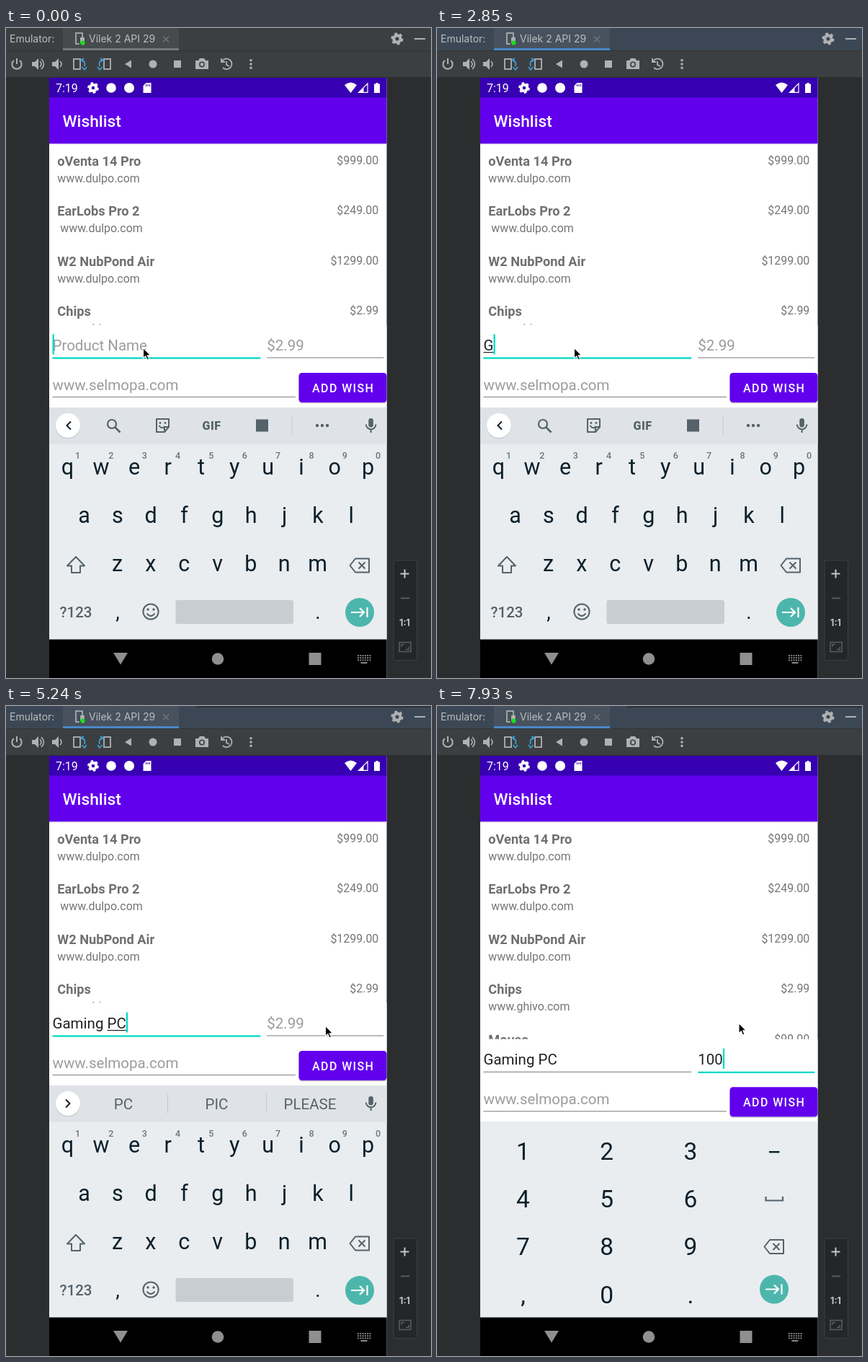
Write an HTML page that moves like this. It is 590 by 901 pixels and loops after 8000 ms.

```html
<!DOCTYPE html>
<html lang="en">
<head>
<meta charset="utf-8">
<title>Wishlist</title>
<style>
  html, body { margin: 0; width: 100%; height: 100%; overflow: hidden; background: #2b2d2f; }
  svg { display: block; width: 590px; height: 901px; }
  text { font-family: Roboto, sans-serif; white-space: pre; }
  .ui { font-family: Inter, sans-serif; }
</style>
</head>
<body>
<svg id="stage" viewBox="0 0 590 901" xmlns="http://www.w3.org/2000/svg"></svg>
<script>
const LOOP = 8000;
const TEAL = '#03dac5', PURPLE = '#6200ee', INK = '#0b1f2a', KEY = '#55626a', TOOL = '#afb1b3';
const HINT = '#9c9c9c', LINE = '#8f8f8f', BODY = '#212121', GREY = '#757575';
const PITCH = 46.35, LEFT = 64.5, PRICE = 362.3;

// Shape helpers
const text = (x, y, s, size, fill, more = '') =>
  `<text x="${x}" y="${y}" font-size="${size}" fill="${fill}" ${more}>${s}</text>`;
const mid = (x, y, s, size, fill, more = '') => text(x, y, s, size, fill, 'text-anchor="middle" ' + more);
const rect = (x, y, w, h, fill, more = '') =>
  `<rect x="${x}" y="${y}" width="${w}" height="${h}" fill="${fill}" ${more}/>`;
const disc = (x, y, r, fill, more = '') => `<circle cx="${x}" cy="${y}" r="${r}" fill="${fill}" ${more}/>`;
const fill = (d, color, more = '') => `<path d="${d}" fill="${color}" ${more}/>`;
const line = (d, color, w = 2, more = '') =>
  `<path d="${d}" fill="none" stroke="${color}" stroke-width="${w}" ${more}/>`;
const ring = (x, y, r, color, w) => disc(x, y, r, 'none', `stroke="${color}" stroke-width="${w}"`);
const at = (x, y, s) => `<g transform="translate(${x} ${y})">${s}</g>`;
const group = (id, s) => `<g id="${id}">${s}</g>`;

const gear = (x, y, r, color) => ring(x, y, r * .55, color, r * .5) +
  disc(x, y, r * .86, 'none', `stroke="${color}" stroke-width="${r * .3}" pathLength="12" stroke-dasharray="1 1"`);
const dots = (x, y, dx, dy, r, color) => [-1, 0, 1].map(i => disc(x + i * dx, y + i * dy, r, color)).join('');
const erase = (x, y) => at(x, y,
  line('M-13.5 0L-6 -9.5H13V9.5H-6Z', KEY, 2, 'stroke-linejoin="round"') + line('M-1.5 -4.5l9 9m0 -9l-9 9', KEY));
const enter = (x, y) => at(x, y, disc(0, 0, 20, '#4db6ac') + line('M-12 0H6M0 -6l6 6l-6 6M10.5 -7V7', '#fff', 2.2));
const speaker = (x, waves) => at(x, 50,
  fill('M-7 -3h4l5 -5v16l-5 -5h-4z', TOOL) + line('M4 -4q4 4 0 8' + (waves ? 'M6 -7q7 7 0 14' : ''), TOOL, 1.6));
const rotate = (x, flip) => `<g transform="translate(${x} 50) scale(${flip} 1)">` +
  rect(-8, -7, 9, 14, 'none', `stroke="${TOOL}" stroke-width="1.8"`) +
  line('M3 -6q6 2 4 9M3.5 4l3.5 4l3 -4M6 -8l-3.5 2l3 3', '#3ba0d8', 1.7) + '</g>';

function frameUi() {
  return rect(0, 0, 590, 901, '#2b2d2f') + rect(0, 0, 590, 31, '#3c3f41', 'id="head"') +
    rect(79, 0, 161, 31, '#fff', 'opacity=".06"') + rect(79, 28, 161, 3, '#747a80', 'id="tabLine"') +
    rect(264, 0, 326, 2, '#2d3235', 'id="strip"') + rect(0, 31, 590, 1, '#323436') +
    text(5, 20, 'Emulator:', 14, '#bbbdbf', 'class="ui"') +
    text(115, 20, 'Vilek 2 API 29', 14, '#bbbdbf', 'class="ui"') +
    rect(97, 7, 9, 15, 'none', `stroke="${TOOL}" stroke-width="1.7"`) +
    rect(102, 13, 8, 10, '#3c3f41') + rect(103, 13, 6, 8, TOOL) + disc(106.5, 20.5, 3.2, '#22d922') +
    line('M218 11.5l8 8m0 -8l-8 8', '#75787a', 1.2) +
    gear(543, 15, 8.5, TOOL) + rect(567, 14, 15, 2, TOOL) +
    rect(0, 32, 590, 36, '#3c3f41') +
    line('M11 45a6.6 6.6 0 1 0 8 0M15 42v8', TOOL, 2) +
    speaker(43, true) + speaker(71, false) + rotate(102, 1) + rotate(137, -1) +
    fill('M165 50l9 -5.5v11z', TOOL) + disc(204, 50, 5.5, TOOL) + rect(233, 45, 10, 10, TOOL) +
    fill('M263 45h4l2 -3h6l2 3h4v12h-18z', TOOL) + ring(272, 50.5, 3.2, '#3c3f41', 1.6) +
    line('M300 46a7.3 7.3 0 1 1 1 9M299 42v5h5M306 46v5l4 2', TOOL, 1.8) + dots(340, 50, 0, 5.3, 1.8, TOOL) +
    rect(538, 738, 32.5, 138.5, '#252627', 'rx="2" stroke="#3d3f40"') +
    line('M547.5 756.5h12m-6 -6v12', '#c4c6c8', 2) + rect(548, 789.5, 12, 1.8, '#5c5e60') +
    mid(553.5, 829, '1:1', 12.5, '#c4c6c8', 'class="ui" font-weight="700"') +
    line('M546 851.5h16v13h-16zM549 858v-3.5h4M559 858v3.5h-4', '#5c5e60', 1.5);
}

function appBar() {
  return rect(60, 69, 468.5, 832, '#fff') + rect(60, 160, 468.5, 1.5, '#e6e4ea') +
    rect(60, 69, 468.5, 28, '#3700b3') + rect(60, 96.5, 468.5, 63.8, PURPLE) +
    text(69, 89, '7:19', 16, '#fff') + gear(121, 83, 7.8, '#fff') +
    disc(146, 83, 6.8, '#fff') + disc(171, 83, 7, '#fff') +
    fill('M194.5 76h7v14h-11v-10z', '#fff') + line('M194.5 78v3m2.4 -3v3m2.4 -3v3', '#3700b3', 1) +
    fill('M470 79q8.5 -7 17 0l-8.5 11z', '#fff') +
    line('M489.5 89.3h12.5v-12.3z', '#fff', 1.2) + fill('M489.5 89.5l7 -7v7z', '#fff') +
    fill('M511 77.5h2.5v-1.5h3v1.5h2.5v12.5h-8z', '#fff') +
    text(78.5, 137, 'Wishlist', 22.8, '#fff', 'font-weight="500"');
}

function wishes() {
  return [
    ['oVenta 14 Pro', 'www.dulpo.com', '$999.00'],
    ['EarLobs Pro 2', ' www.dulpo.com', '$249.00'],
    ['W2 NubPond Air', 'www.dulpo.com', '$1299.00'],
    ['Chips', 'www.ghivo.com', '$2.99'],
    ['Mouse', '', '$99.00']
  ].map(([name, site, price], i) => at(0, i * 69.45,
    text(71.3, 191, name, 18.2, '#6f6f6f', 'font-weight="700"') +
    text(71.3, 213.7, site, 15.95, GREY) +
    text(517.3, 188.8, price, 15.95, GREY, 'text-anchor="end"'))).join('');
}

function form() {
  return group('form', rect(60, 411.5, 468.5, 116, '#fff') +
    text(LEFT, 447, '', 20.5, HINT, 'id="name"') + text(PRICE, 447, '', 20.5, HINT, 'id="price"') +
    text(LEFT, 501.7, 'www.selmopa.com', 20.5, HINT) +
    rect(LEFT, 456.4, 288.8, 2.3, TEAL, 'id="nameLine"') + rect(PRICE, 456.4, 162, 1.2, LINE, 'id="priceLine"') +
    rect(LEFT, 510.9, 337.5, 1.2, LINE) + rect(0, 449, 0, 1.2, BODY, 'id="compose"') +
    rect(0, 424.5, 2.3, 28, TEAL, 'id="caret"') +
    rect(406.5, 479.5, 122, 41, '#000', 'rx="4.5" opacity=".2"') +
    rect(406.5, 478, 122, 41, PURPLE, 'rx="4.5"') +
    mid(468.2, 504.7, 'ADD WISH', 15.95, '#fff', 'font-weight="500" letter-spacing="1.42"'));
}

function letterKeys() {
  const row = (keys, x, y) => [...keys].map((k, i) => mid(x + i * PITCH, y, k, 30.5, INK)).join('');
  const digits = [...'1234567890'].map((k, i) =>
    mid(99.5 + i * PITCH, 597, k, 12.5, '#6b767d', 'font-weight="500"')).join('');
  const tools = line('M90 545.5l-5.5 5.5l5.5 5.5', INK, 2) +
    ring(147, 549, 6, KEY, 2.2) + line('M151.5 553.5l7 7', KEY, 2.6) +
    line('M209 542h17v11l-6 7h-11zM226 553h-6v7M212.5 551q4 6 8 1', KEY, 2, 'stroke-linejoin="round"') +
    disc(214, 547.5, 1.4, KEY) + disc(221, 547.5, 1.4, KEY) +
    mid(285.5, 556.5, 'GIF', 16, KEY, 'font-weight="900" letter-spacing=".5"') +
    rect(347, 542.5, 17, 17, KEY) + rect(396.5, 538.5, 1, 25, '#c3c9ce') + dots(439, 551, 7, 0, 2.2, KEY);
  const words = line('M83 545.5l5.5 5.5l-5.5 5.5', INK, 2) +
    [163, 292.5, 422].map(x => mid(x, 559, '', 20.5, KEY, 'class="word"')).join('') +
    rect(224, 537.5, 1, 27, '#c3c9ce') + rect(361, 537.5, 1, 27, '#c3c9ce');
  return group('letters', rect(60, 526, 468.5, 322, '#e9edf0') + rect(60, 526, 468.5, 51, '#dfe3e7') +
    disc(86, 552, 17.3, '#000', 'opacity=".12"') + disc(86, 551, 17, '#fff') +
    group('tools', tools) + group('words', words) +
    rect(503.3, 541, 6.6, 12.5, KEY, 'rx="3.3"') + line('M499.8 549.5a6.8 6.8 0 0 0 13.6 0M506.6 556.5v4.5', KEY, 2) +
    row('qwertyuiop', 85.5, 619) + digits + row('asdfghjkl', 108.5, 686) + row('zxcvbnm', 154.5, 753) +
    line('M97 733l-12 12.5h6v9.5h12v-9.5h6z', KEY, 2, 'stroke-linejoin="round"') + erase(491, 745) +
    mid(97, 817, '?123', 20.5, KEY, 'font-weight="500"') + mid(155, 819, ',', 28, INK) +
    ring(201, 809, 10.6, KEY, 2) + disc(197, 806, 1.7, KEY) + disc(205, 806, 1.7, KEY) +
    line('M195.5 811.5q5.5 7 11 0', KEY, 2) +
    rect(235.5, 793, 163.5, 33, '#c8cdd1', 'rx="3"') + mid(433, 819, '.', 28, INK) + enter(491, 810));
}

function numberKeys() {
  const keys = ['123', '456', '789', ',0.'].map((row, r) =>
    [...row].map((k, c) => mid(119.5 + c * 116.2, 629 + r * 66.2, k, 33.5, INK)).join('')).join('');
  return group('numbers', rect(60, 576, 468.5, 272, '#e9edf0') + keys + rect(461, 617, 14.5, 2.4, INK) +
    line('M456.5 680v5.5h23.5v-5.5', KEY, 2.2) + erase(468, 749.5) + enter(468, 808.5));
}

function navBar() {
  let pad = '';
  for (let r = 0; r < 3; r++) for (let c = 0; c < 6; c++)
    pad += rect(488 + c * 3.3, 869 + r * 3.2, 1.9, 1.9, '#8f8f8f');
  return rect(60, 847.5, 468.5, 54, '#000') + fill('M149 866h20l-10 16.5z', '#8f8f8f') +
    disc(294, 874.5, 8.3, '#8f8f8f') + rect(420.5, 866, 17, 17, '#8f8f8f') + pad + rect(492.5, 879, 9, 1.9, '#8f8f8f');
}

const pointer = group('pointer',
  fill('M0 0V14.2L3.3 11.2L5.6 16.6L8 15.6L5.7 10.4H10.2Z', '#000', 'stroke="#fff" stroke-width="1.1"'));

const stage = document.getElementById('stage');
stage.innerHTML = frameUi() + appBar() + wishes() + form() + letterKeys() + numberKeys() + navBar() + pointer;

// Each step changes part of the state from its time on.
const start = { name: '', price: '', compose: 0, caret: true, active: false, strip: false,
  words: null, press: 0, digits: false, mouse: [190.5, 443.5] };
const typed = (name, words, compose = 0) => ({ name, compose, words: words && words.split(' '), caret: true });
const on = { caret: true }, off = { caret: false };
const steps = [
  [0, {}], [450, off], [1050, on], [1500, off], [1950, on],
  [2100, { active: true }],
  [2850, typed('G', null)],
  [3000, typed('Ga', 'Ga Game Gas')],
  [3150, typed('Gam', 'Gam Game Games')],
  [3300, typed('Gami', 'Gami Gaming Gamin')],
  [3450, typed('Gamin', 'Gamin Gaming Gaming\'s')],
  [3600, typed('Gaming', 'Gaming Gaming\'s Gamings')],
  [4050, off],
  [4500, typed('Gaming ', 'and PC is', 7)],
  [4790, typed('Gaming P', 'P PC PLEASE', 7)],
  [4940, typed('Gaming PC', 'PC PIC PLEASE', 7)],
  [5090, { mouse: [352, 447], strip: true }],
  [5240, { mouse: [443.5, 443.5] }],
  [5690, { caret: false, mouse: [437, 448.5] }],
  [5830, { mouse: [419, 439.5] }],
  [6130, on],
  [6280, { press: .5 }],
  [6430, { press: 1 }],
  [6580, { digits: true, press: 0, compose: 9 }],
  [7030, off],
  [7480, { price: '1', caret: true }],
  [7780, { price: '10' }],
  [7930, { price: '100' }]
];

const $ = id => document.getElementById(id);
const set = (id, attrs) => { for (const k in attrs) $(id).setAttribute(k, attrs[k]); };
const show = (id, yes) => set(id, { visibility: yes ? 'visible' : 'hidden' });
const wordEls = [...document.querySelectorAll('.word')];

function field(id, value, hint, hintColor) {
  $(id).textContent = value || hint;
  set(id, { fill: value ? BODY : hintColor });
  return value ? $(id).getComputedTextLength() : 0;
}

function draw(s) {
  set('head', { fill: s.active ? '#3b4754' : '#3c3f41' });
  set('tabLine', { fill: s.active ? '#4a88c7' : '#747a80' });
  show('strip', s.strip);
  set('form', { transform: `translate(0 ${s.digits ? 50.3 : 0})` });

  const nameEnd = LEFT + field('name', s.name, 'Product Name', HINT);
  const priceEnd = PRICE + field('price', s.price, '$2.99', s.press ? GREY : HINT);
  const prefix = s.compose ? $('name').getSubStringLength(0, Math.min(s.compose, s.name.length)) : 0;
  set('compose', { x: LEFT + prefix, width: s.name ? Math.max(0, nameEnd - LEFT - prefix) : 0 });
  set('caret', { x: s.digits ? priceEnd : nameEnd });
  show('caret', s.caret);

  const underline = (id, lit) => set(id, { fill: lit ? TEAL : LINE, height: lit ? 2.3 : 1.2 });
  underline('nameLine', !s.digits);
  underline('priceLine', s.digits || s.press);
  set('priceLine', { opacity: s.press === .5 ? .7 : 1 });

  set('letters', { display: s.digits ? 'none' : 'inline' });
  set('numbers', { display: s.digits ? 'inline' : 'none' });
  set('tools', { display: s.words ? 'none' : 'inline' });
  set('words', { display: s.words ? 'inline' : 'none' });
  wordEls.forEach((el, i) => { el.textContent = s.words ? s.words[i] : ''; });
  set('pointer', { transform: `translate(${s.mouse})` });
}

let shown = -1;
function tick() {
  const t = performance.now() % LOOP;
  const count = steps.filter(([time]) => time <= t).length;
  if (count !== shown) {
    shown = count;
    draw(Object.assign({}, start, ...steps.slice(0, count).map(step => step[1])));
  }
  requestAnimationFrame(tick);
}
tick();
</script>
</body>
</html>
```
